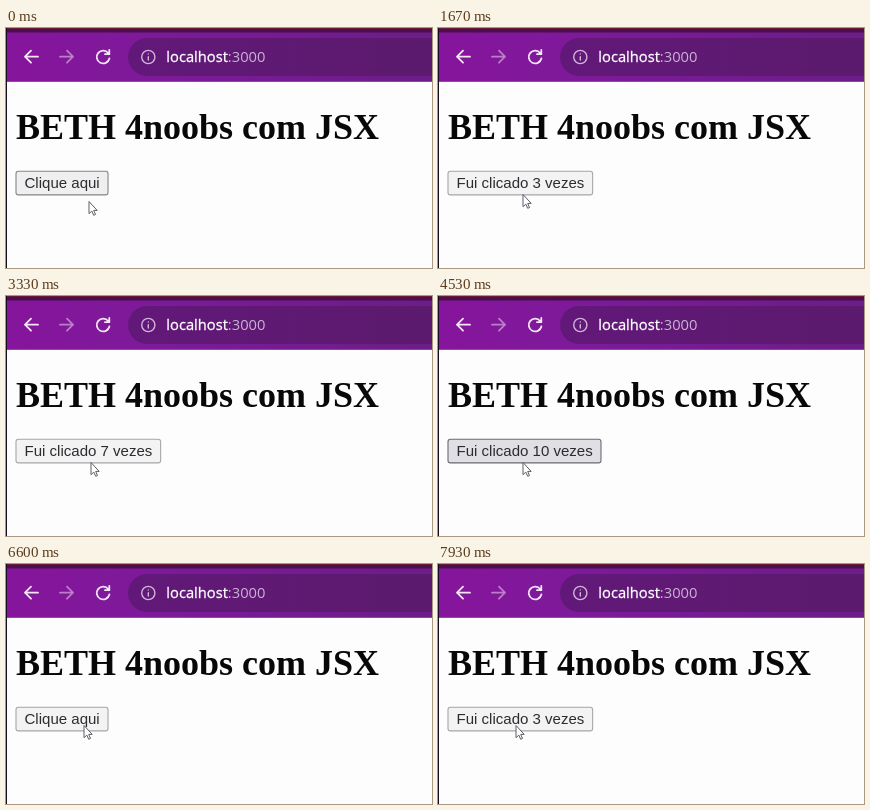
Write an HTML page that moves like this. It is 426 by 240 pixels and loops after 8 s.

```html
<!DOCTYPE html>
<html lang="pt">
<head>
<meta charset="utf-8">
<title>Contador</title>
<style>
html, body { margin: 0; width: 100%; height: 100%; overflow: hidden; background: #fdfdfd; }
svg { display: block; width: 100%; height: 100%; }
.url { font: 14.7px "Open Sans", "Noto Sans", sans-serif; }
.host { stroke: #fff; stroke-width: .3; }
.title { font: bold 36px "Liberation Serif", "Times New Roman", serif; }
.label { font: 15.04px "Liberation Sans", Arial, sans-serif; }
.icon { fill: none; stroke: #f4e8f6; stroke-width: 1.8; stroke-linecap: round; stroke-linejoin: round; }
</style>
</head>
<body>
<svg viewBox="0 0 426 240">
  <defs>
    <linearGradient id="bar">
      <stop offset="0" stop-color="#86159c"/>
      <stop offset=".35" stop-color="#7d1a9a"/>
      <stop offset="1" stop-color="#6c1d88"/>
    </linearGradient>
    <linearGradient id="pill">
      <stop offset="0" stop-color="#621879"/>
      <stop offset="1" stop-color="#5b1b6c"/>
    </linearGradient>
    <path id="arrow" d="M7 0H-6M0 -6L-6 0L0 6"/>
  </defs>
  <rect width="426" height="240" fill="#fdfdfd"/>
  <rect width="426" height="53.8" fill="url(#bar)"/>
  <rect width="426" height="4.5" fill="#4b0f50"/>
  <rect width="426" height="1" fill="#6b1b35"/>
  <rect x="122" y="10" width="330" height="38" rx="19" fill="url(#pill)"/>
  <rect width="1" height="240" fill="#180c20"/>

  <g class="icon">
    <use href="#arrow" x="25" y="28.7"/>
    <use href="#arrow" transform="translate(61 28.7) scale(-1 1)" opacity=".5"/>
    <path d="M102.3 25.2A6.4 6.4 0 1 0 103.4 30.5M103.3 22V26.2H99"/>
    <g stroke-width="1.4" opacity=".75">
      <circle cx="142.3" cy="29" r="6.6"/>
      <path d="M142.3 28.6V32M142.3 25.9V26"/>
    </g>
  </g>
  <text class="url" x="160.3" y="34" fill="#fff"><tspan class="host">localhost</tspan><tspan fill="#cbb2d4">:3000</tspan></text>

  <text class="title" x="10" y="111" fill="#080808">BETH 4noobs com JSX</text>
  <rect id="button" x="10" y="143.3" height="23.6" rx="2.4" stroke-width="1.1"/>
  <text id="label" class="label" x="18.5" y="160" fill="#2c2c30"></text>
  <path id="cursor" d="M0 0V12.2L2.8 9.6L4.7 13.8L6.5 13L4.7 8.9H8.2Z"
        fill="#fff" stroke="#5c5c66" stroke-width="1" stroke-linejoin="round"/>
</svg>
<script>
const LOOP = 8000, RELOAD = 5470, PRESS = 110;
const clicks = [600, 1000, 1370, 1770, 2170, 2630, 3030, 3400, 3870, 4270, 6670, 7130, 7600, 8000];
// time, x, y
const path = [
  [0, 83, 173.5], [120, 83, 173.5], [420, 85, 166.5], [4700, 85, 166.5],
  [5300, 98, 31], [5600, 98, 31], [6250, 78, 161.5], [LOOP, 78, 161.5]
];
const looks = {
  idle: ["#efeff0", "#84848a"],
  hover: ["#e0e0e4", "#6a6a72"],
  active: ["#f3f3f4", "#a6a6ab"]
};
const [button, label, cursor] = ["button", "label", "cursor"].map(id => document.getElementById(id));

function cursorAt(t) {
  const i = path.findIndex(p => p[0] > t);
  const [t0, x0, y0] = path[i - 1], [t1, x1, y1] = path[i];
  const k = (t - t0) / (t1 - t0), e = k * k * (3 - 2 * k);
  return [x0 + (x1 - x0) * e, y0 + (y1 - y0) * e];
}

function draw(t) {
  const start = t < RELOAD ? 0 : RELOAD;
  const count = clicks.filter(c => c > start && c <= t).length;
  const text = count ? `Fui clicado ${count} vezes` : "Clique aqui";
  if (label.textContent !== text) label.textContent = text;
  const width = label.getComputedTextLength() + 16.8;
  button.setAttribute("width", width);

  const [x, y] = cursorAt(t);
  cursor.setAttribute("transform", `translate(${x} ${y})`);
  const over = x > 10 && x < 10 + width && y > 143 && y < 168;
  const pressed = clicks.some(c => t >= c - PRESS && t < c);
  const [fill, stroke] = looks[pressed ? "active" : over ? "hover" : "idle"];
  button.setAttribute("fill", fill);
  button.setAttribute("stroke", stroke);
}

const begin = performance.now();
function tick() {
  draw((performance.now() - begin) % LOOP);
  requestAnimationFrame(tick);
}
tick();
</script>
</body>
</html>
```
